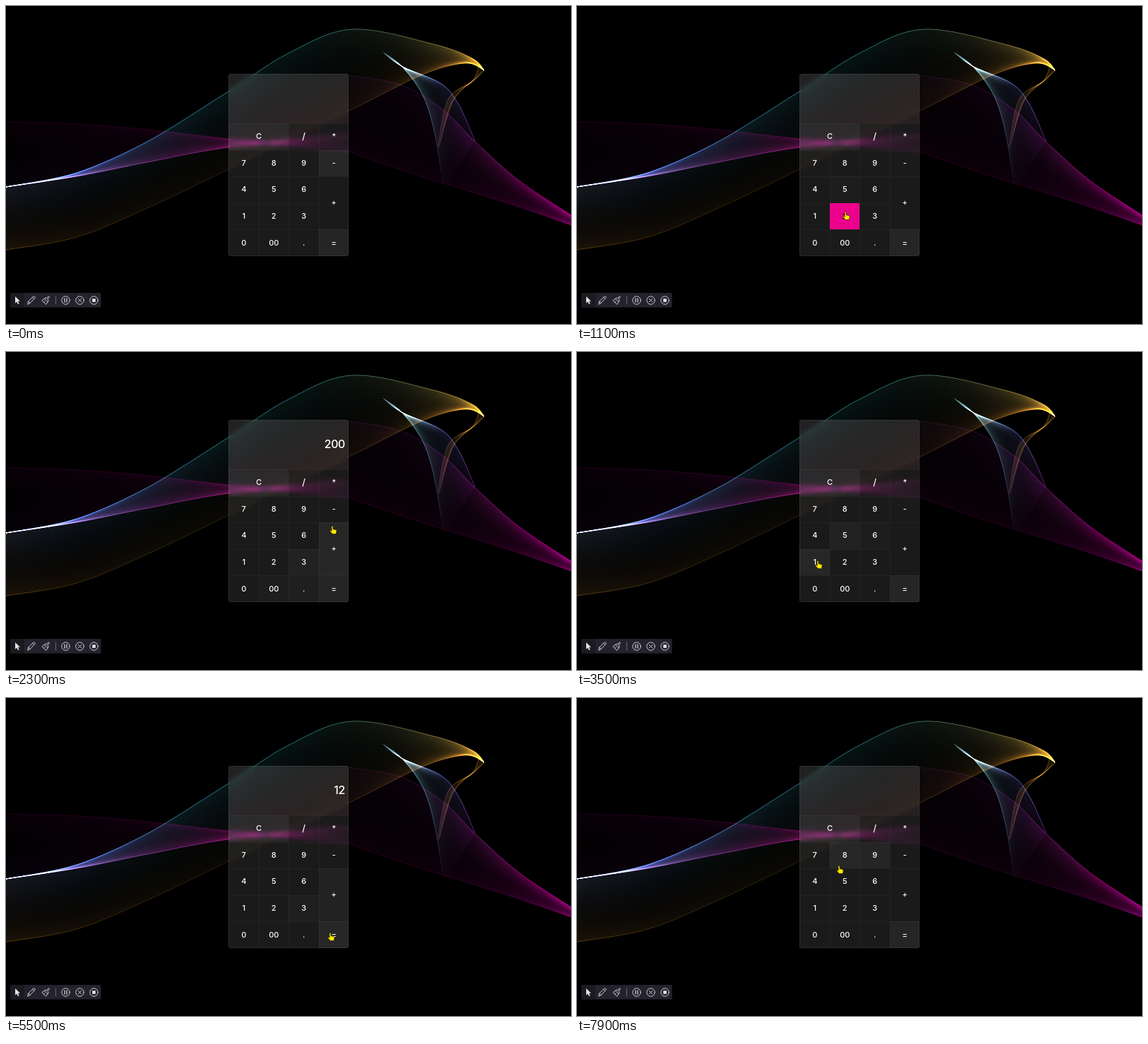
Animation, 800 px wide and 450 px high, one loop 8000 ms. Source, as an HTML page with a canvas:

```html
<!DOCTYPE html>
<html lang="en">
<head>
<meta charset="utf-8">
<title>Glass calculator</title>
<style>
html, body { margin: 0; width: 100%; height: 100%; overflow: hidden; background: #000; }
#stage { position: relative; width: 800px; height: 450px; overflow: hidden; background: #000; }
#stage > * { position: absolute; }
#calc {
  left: 315px; top: 96px; width: 170px; height: 258px; border-radius: 3px; overflow: hidden;
  background: rgba(255,248,255,.1); backdrop-filter: blur(3px);
  font: 500 11px Inter, sans-serif; color: #fff;
}
#calc::after {
  content: ""; position: absolute; inset: 0; border-radius: 3px;
  border: 1px solid rgba(255,255,255,.07); box-sizing: border-box;
}
#calc div { position: absolute; box-sizing: border-box; }
#show {
  left: 0; top: 0; width: 170px; height: 70px; padding-right: 5px;
  background: linear-gradient(165deg, rgba(255,255,255,.03), rgba(170,90,110,.09));
  font-size: 16px; line-height: 69px; letter-spacing: -.4px; text-align: right;
}
.key {
  display: flex; align-items: center; justify-content: center; padding-bottom: 2px;
  border: solid rgba(255,255,255,.035); border-width: 1px 0 0 1px;
}
svg { left: 0; top: 0; width: 800px; height: 450px; }
</style>
</head>
<body>
<div id="stage">
  <canvas id="bg" width="800" height="450"></canvas>
  <div id="calc"><div id="show"></div></div>
  <svg viewBox="0 0 800 450" fill="none" stroke="#d0d0d4" stroke-linecap="round" stroke-linejoin="round">
    <rect x="6" y="406" width="128.500" height="20.500" rx="1" fill="#24222d" stroke="none"/>
    <rect x="6" y="406" width="20" height="20.500" rx="1" fill="#1b1a20" stroke="none"/>
    <path d="M13 411v9.500l2.300-2 1.600 3.600 1.700-.8-1.600-3.500h3z" fill="#e4e4e6" stroke="none"/>
    <path d="M30.800 421.700l.9-3.700 7-7q1.100-.6 2 .3t.2 2l-7 7.200zM31.700 418l2.200 2.500M37.400 412.300l2.300 2.200"/>
    <path d="M51.300 417l5.300 5.300 2.600-3.600-4.500-4.400zM54.700 414.300l1.600-1.600 1.300 1.200 2.600-3.300 1.400 1.300-2.900 3 1.500 1.500-1 2.300M53.600 419.200l1.500-1.600"/>
    <path d="M70.500 411v11" stroke="#686675"/>
    <circle cx="84.500" cy="416.500" r="5.700"/><path d="M83 414v5m3-5v5" stroke-width="1.300"/>
    <circle cx="104.500" cy="416.500" r="5.700"/><path d="M102.300 414.300l4.400 4.400m0-4.400l-4.400 4.400"/>
    <circle cx="124.500" cy="416.500" r="5.700"/><rect x="122.200" y="414.200" width="4.600" height="4.600" fill="#e4e4e6" stroke="none"/>
    <path id="hand" d="M-1 1Q0-.6 1 1V4.600L5.300 5.700Q6.500 6.300 6 8L5.200 11.500H.2L-3.200 7.500Q-3.300 6-1.900 6.400L-1 7.200Z"
      fill="#ffe900" stroke="#2a2400" stroke-width=".7"/>
  </svg>
</div>
<script>
const $ = id => document.getElementById(id);
const g = $('bg').getContext('2d');

// Catmull-Rom curve through "x,y" points, evenly sampled
function curve(text) {
  const pts = text.split(' ').map(p => p.split(',').map(Number));
  const n = pts.length, out = [];
  for (let s = 0; s <= 80; s++) {
    const u = s / 80 * (n - 1), i = Math.min(n - 2, Math.floor(u)), f = u - i;
    const [a, b, c, d] = [i - 1, i, i + 1, i + 2].map(j => pts[Math.max(0, Math.min(n - 1, j))]);
    out.push([0, 1].map(k => b[k] + f / 2 * (c[k] - a[k] +
      f * (2 * a[k] - 5 * b[k] + 4 * c[k] - d[k] + f * (3 * (b[k] - c[k]) + d[k] - a[k])))));
  }
  return out;
}

// Colours spread evenly from one end of a curve to the other
function tint(pts, colors) {
  const grad = g.createLinearGradient(...pts[0], ...pts.at(-1));
  colors.split(' ').forEach((c, i, all) => grad.addColorStop(i / (all.length - 1), '#' + c));
  return grad;
}

// A sheet of fine threads between two curves, glowing along both edges
function ribbon([top, topColors], [low, lowColors], fill, rim, count) {
  const a = curve(top), b = curve(low);
  const ta = tint(a, topColors), tb = tint(b, lowColors);
  const thread = (k, style, alpha) => {
    g.globalAlpha = alpha;
    g.strokeStyle = style;
    g.beginPath();
    a.forEach(([x, y], i) => g.lineTo(x + (b[i][0] - x) * k, y + (b[i][1] - y) * k));
    g.stroke();
  };
  for (let i = 0; i <= count; i++) {
    const k = i / count;
    thread(k, ta, fill * (.1 + .9 * (1 - k) ** 2));
    thread(k, tb, fill * (.1 + .9 * k ** 3));
  }
  thread(0, ta, rim);
  thread(1, tb, rim * .6);
}

function paintWaves() {
  g.globalCompositeOperation = 'lighter';
  const crest = '0,256 100,236 200,192 315,121 400,67 490,33 605,54 660,74 677,91';
  const base = '0,345 100,327 200,286 315,231 400,188 490,146 590,97 650,81 677,91';
  const seam = '0,256 100,241 200,221 315,200 485,182';
  ribbon([crest, '7a96c8 3c6eaa 2d8ca0 34a0aa 309a9a 6a8458 c8902c'],
    [base, 'a06a18 70480f 5a3a0c 463010 503414 96601c c0822a'], .24, .55, 60);
  ribbon(['0,256 100,236 200,192 255,158 315,121', '323c78 3246a0 1e3c78 0a1e32 000'],
    [seam, '8c96dc 9678c8 6e2882 6e1458 320a28'], .16, .45, 45);
  ribbon([seam, '281446 500a50 6e0a50 6e0a50 320a28'],
    ['0,164 100,167 200,175 315,188 485,206', '46003a 5a0046 640050 5a0046 3c0030'], .22, .4, 44);
  ribbon(['485,98 560,112 620,148 662,190 725,246 800,296', '280828 3c0a3c 64146e aa1e96 a0007a 8c006e'],
    ['485,206 560,232 620,251 662,264 725,284 800,310', '460034 460034 460034 46003a 500040 640050'], .26, .5, 70);
  ribbon(['532,64 560,85 616,110 641,140 664,191', '000 96d2f0 6e78dc 7850be 6e1e82'],
    ['532,64 560,85 590,126 607,180 620,260', '000 8cd2e6 5a96aa 32505f 000'], .24, .6, 34);
  ribbon(['677,91 665,103 633,134 613,200', 'b47c24 a06a28 825030 201418'],
    ['670,83 660,106 626,132 611,200', '8c6420 78521e 5a3820 181014'], .22, .45, 12);
}

// Repeated letters merge into one wide or tall key
const layout = ['CC/*', '789-', '456+', '123+', '0d.='];
const cellW = 42.5, cellH = 37.6, left = 315, top0 = 166;
const keys = [...new Set(layout.join(''))].map(ch => {
  const rows = layout.flatMap((row, r) => row.includes(ch) ? [r] : []);
  const row = layout[rows[0]], c = row.indexOf(ch), c2 = row.lastIndexOf(ch) + 1;
  const r = rows[0], r2 = rows.at(-1) + 1;
  const el = document.createElement('div');
  el.className = 'key';
  el.textContent = ch === 'd' ? '00' : ch;
  el.style.cssText = `left:${c * cellW}px;top:${70 + r * cellH}px;` +
    `width:${(c2 - c) * cellW}px;height:${(r2 - r) * cellH}px`;
  if (ch === '/') el.style.fontSize = '13px';
  $('calc').append(el);
  const has = ([x, y]) => {
    const u = (x - left) / cellW, v = (y - top0) / cellH;
    return u >= c && u < c2 && v >= r && v < r2;
  };
  return { label: el.textContent, el, has };
});
const keyAt = p => keys.find(k => k.has(p));

// Pointer stops: arrival time, x, y, whether it clicks there
const stops = [
  [0, 466, 222], [900, 380, 291, 1], [1500, 379, 330, 1], [2300, 462, 246, 1],
  [3500, 341, 295, 1], [4200, 380, 294, 1], [5500, 459, 332, 1], [6800, 471, 202],
  [7100, 380, 188, 1], [7800, 408, 222], [7900, 371, 237]
].map(([at, x, y, clicks]) => ({ at, pos: [x, y], down: clicks ? at + 100 : Infinity, free: clicks ? at + 300 : at }));

// Sideways motion leads, vertical motion follows
function pointer(t) {
  const i = stops.findIndex(s => s.at >= t);
  if (i < 0) return stops.at(-1).pos;
  if (!i) return stops[0].pos;
  const from = stops[i - 1], to = stops[i], start = Math.max(from.free, to.at - 700);
  const k = Math.max(0, (t - start) / (to.at - start)), e = k * k * (3 - 2 * k);
  return [e, e ** 3].map((f, j) => from.pos[j] + (to.pos[j] - from.pos[j]) * f);
}

function display(t) {
  let shown = '', stored = 0;
  for (const { pos, down } of stops) {
    if (t < down + 200) continue;
    const { label } = keyAt(pos);
    if (label === '=') shown = String(stored + Number(shown));
    else if (label === '+') [stored, shown] = [Number(shown), ''];
    else if (label === 'C') shown = '';
    else shown += label;
  }
  return shown;
}

function render(t) {
  $('hand').setAttribute('transform', `translate(${pointer(t)})`);
  $('hand').style.visibility = t < 100 ? 'hidden' : 'visible';
  $('show').textContent = display(t);
  const held = stops.find(s => t >= s.down && t < s.down + 200);
  for (const key of keys) {
    // Hover lights at once and fades over half a second
    let lit = 'C='.includes(key.label) ? .8 : 0;
    for (let k = 0; k < 5; k++)
      if (t >= k * 100 && key.has(pointer(t - k * 100))) lit = Math.max(lit, 1 - k / 5);
    const on = held && key.has(held.pos);
    key.el.style.background = on ? '#ec008c' : `rgba(255,255,255,${lit * .06})`;
    key.el.style.color = on ? '#111' : '#fff';
  }
}

paintWaves();
let last = -1;
function tick() {
  const t = Math.floor(performance.now() % 8000 / 100) * 100;
  if (t !== last) render(last = t);
  requestAnimationFrame(tick);
}
tick();
</script>
</body>
</html>
```
